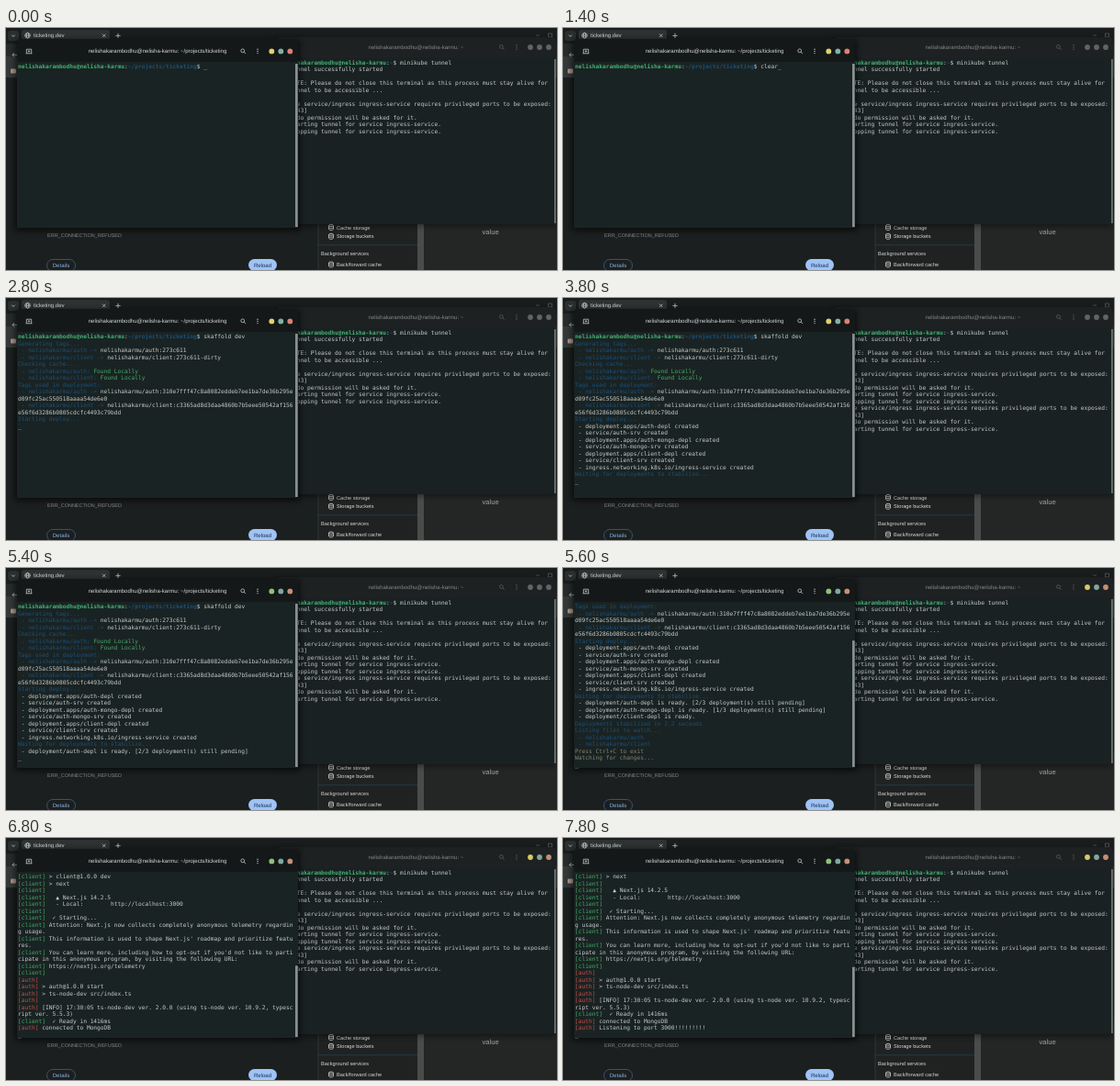
Animation, 600 px wide and 264 px high, one loop 8000 ms. Source, as an HTML page:

```html
<!DOCTYPE html>
<html lang="en">
<head>
<meta charset="utf-8">
<title>Terminal session</title>
<style>
  html, body { margin: 0; width: 100%; height: 100%; overflow: hidden; background: #1c1f1f; }
  svg { display: block; width: 600px; height: 264px; }
  text { text-rendering: geometricPrecision; white-space: pre; }
  .ui { font-family: "Liberation Sans", Arial, sans-serif; font-size: 6.05px; fill: #d4d8d8; }
  .mono { font-family: "DejaVu Sans Mono", "Noto Sans Mono", monospace; font-size: 6.23px; fill: #c6cbca; }
  .p { fill: #42b073; font-weight: bold; }
  .d { fill: #1a5079; font-weight: bold; }
  .b { fill: #1a5079; }
  .g { fill: #44ab66; }
  .r { fill: #c44f49; }
  .y { fill: #84836c; }
  .line { fill: none; stroke: #c4c9c9; stroke-width: .8; }
</style>
</head>
<body>
<svg viewBox="0 0 600 264">
  <defs>
    <g id="search" class="line"><circle cx="-.6" cy="-.6" r="1.9"/><path d="M.8 .8L2.7 2.7"/></g>
    <g id="menu" fill="#c4c9c9"><circle cy="-2.2" r=".7"/><circle r=".7"/><circle cy="2.2" r=".7"/></g>
    <g id="store" class="line" stroke-width=".7">
      <ellipse cy="-2" rx="2.5" ry="1"/><path d="M-2.5 -2V2C-2.5 3.3 2.5 3.3 2.5 2V-2M-2.5 0C-2.5 1.3 2.5 1.3 2.5 0"/>
    </g>
    <filter id="soft" x="-10%" y="-10%" width="120%" height="120%"><feGaussianBlur stdDeviation="3"/></filter>
  </defs>

  <!-- browser -->
  <rect width="600" height="264" fill="#1c1f1f"/>
  <rect width="600" height="17" fill="#1a1d1d"/>
  <rect x="2" y="3" width="12" height="11" rx="3" fill="#2a2f30"/>
  <path class="line" d="M6.3 7.6L8 9.4L9.7 7.6"/>
  <path d="M14 17Q17 17 17 14V5Q17 2 20 2H110Q113 2 113 5V14Q113 17 116 17Z" fill="#2e3233"/>
  <rect y="17" width="600" height="14" fill="#262a2b"/>
  <rect y="31" width="600" height="23" fill="#343838"/>
  <g class="line" stroke-width=".6"><circle cx="23.5" cy="8.2" r="2.8"/><ellipse cx="23.5" cy="8.2" rx="1.2" ry="2.8"/><path d="M20.7 8.2H26.3"/></g>
  <text class="ui" x="30" y="10.4">ticketing.dev</text>
  <path class="line" d="M105 6.6L108.4 10M108.4 6.6L105 10M119.4 8.4H124.6M122 5.8V11"/>
  <path class="line" d="M577 8H581M590.5 6H594.5V9.8H590.5Z" opacity=".35"/>
  <path class="line" d="M12 29.3H7M9.2 27L6.9 29.3L9.2 31.6"/>
  <rect x="5" y="44.5" width="6" height="5" rx="1" fill="#a9938a"/>
  <text class="ui" x="45" y="227.8" style="font-size:5.5px;fill:#858b8c">ERR_CONNECTION_REFUSED</text>
  <rect x="44.5" y="252.5" width="31" height="13" rx="6.5" fill="none" stroke="#3c6187" stroke-width=".8"/>
  <text class="ui" x="60" y="261" text-anchor="middle" style="fill:#82b0e8">Details</text>
  <rect x="264" y="252" width="31" height="13" rx="6.5" fill="#9fc3f5"/>
  <text class="ui" x="279.5" y="260.6" text-anchor="middle" style="fill:#163254">Reload</text>

  <!-- developer tools -->
  <rect x="340" y="200" width="108" height="64" fill="#202221"/>
  <rect x="448" y="200" width="7" height="64" fill="#4a4c4b"/>
  <rect x="455" y="200" width="145" height="64" fill="#242626"/>
  <path d="M340 200V264" stroke="#343d40" stroke-width=".8"/>
  <path d="M340 236.8H448" stroke="#233d45" stroke-width="1"/>
  <use href="#store" x="354" y="217.5"/><use href="#store" x="354" y="227.3"/><use href="#store" x="354" y="258"/>
  <g class="ui" style="font-size:5.6px">
    <text x="360" y="219.5">Cache storage</text>
    <text x="360" y="229.3">Storage buckets</text>
    <text x="343" y="248">Background services</text>
    <text x="360" y="260">Back/forward cache</text>
  </g>
  <text class="ui" x="518.5" y="224.6" style="font-size:7.6px;fill:#a0a5a5">value</text>

  <!-- right terminal -->
  <rect x="294" y="12" width="305" height="204" fill="#000" opacity=".45" filter="url(#soft)"/>
  <path d="M294 214V15Q294 10 299 10H594Q599 10 599 15V214Z" fill="#192122"/>
  <path d="M294 32V15Q294 10 299 10H594Q599 10 599 15V32Z" fill="#1e2122"/>
  <text class="ui title" x="446.5" y="22.8" text-anchor="middle" style="fill:#828787"></text>
  <g opacity=".35"><use href="#search" x="540" y="21"/><use href="#menu" x="556" y="21"/></g>
  <g id="dotsR"></g>
  <g id="right" class="mono"></g>
  <rect x="597" y="34" width="1.8" height="179" fill="#6d7373"/>

  <!-- left terminal -->
  <rect x="10" y="13" width="310" height="208" fill="#000" opacity=".6" filter="url(#soft)"/>
  <path d="M12 218V17Q12 12 17 12H313Q318 12 318 17V218Z" fill="#1a2323"/>
  <path d="M12 37V17Q12 12 17 12H313Q318 12 318 17V37Z" fill="#141818"/>
  <path class="line" d="M22.3 27.8V23.2H27.7V27.8M21.6 27.8H28.4M25 24.2V26.6M23.8 25.4H26.2" stroke-width=".7"/>
  <text class="ui title" x="165" y="27.4" text-anchor="middle"></text>
  <use href="#search" x="258.3" y="25.4"/><use href="#menu" x="274" y="25.4"/>
  <g id="dotsL"></g>
  <g id="left" class="mono"></g>
  <rect id="thumb" x="315" width="2.7" fill="#8a9090"/>
</svg>
<script>
const USER = 'nelishakarambodhu', HOST = 'nelisha-karmu', REPO = 'nelishakarmu';
const LOOP = 8000, ROWS = 24, ROW_H = 7.5;
const $ = id => document.getElementById(id);

// {x text} colours a run with class x
const prompt = (dir, cmd) => `{p ${USER}@${HOST}}:{d ${dir}}$ ${cmd}`;
const c = s => '{g [client]}' + s;
const a = s => '{r [auth]}' + s;
const tag = (app, v) => `{b  - ${REPO}/${app} -> }${REPO}/${app}:${v}`;
const found = app => `{b  - ${REPO}/${app}: }{g Found Locally}`;

const typed = [[0, ''], [1400, 'clear'], [1600, 'skaffold dev']];
const ENTER = 1800;

const output = [
  [2800, [
    '{b Generating tags...}',
    tag('auth', '273c611'),
    tag('client', '273c611-dirty'),
    '{b Checking cache...}',
    found('auth'),
    found('client'),
    '{b Tags used in deployment:}',
    tag('auth', '310e7fff47c8a8082eddeb7ee1ba7de36b295e'),
    'd09fc25ac550518aaaa54de6e0',
    tag('client', 'c3365ad8d3daa4860b7b5eee50542af156'),
    'e56f6d3286b0805cdcfc4493c79bdd',
    '{b Starting deploy...}'
  ]],
  [3400, [
    ...['deployment.apps/auth-depl', 'service/auth-srv', 'deployment.apps/auth-mongo-depl',
      'service/auth-mongo-srv', 'deployment.apps/client-depl', 'service/client-srv',
      'ingress.networking.k8s.io/ingress-service'].map(n => ` - ${n} created`),
    '{b Waiting for deployments to stabilize...}'
  ]],
  [4600, [' - deployment/auth-depl is ready. [2/3 deployment(s) still pending]']],
  [5600, [
    ' - deployment/auth-mongo-depl is ready. [1/3 deployment(s) still pending]',
    ' - deployment/client-depl is ready.',
    '{b Deployments stabilized in 2.2 seconds}',
    '{b Listing files to watch...}',
    `{b  - ${REPO}/auth}`,
    `{b  - ${REPO}/client}`,
    '{y Press Ctrl+C to exit}',
    '{y Watching for changes...}'
  ]],
  [5800, [
    c(''),
    c(' > client@1.0.0 dev'),
    c(' > next'),
    c(''),
    c('   ▲ Next.js 14.2.5'),
    c('   - Local:        http://localhost:3000'),
    c(''),
    c('  ✓ Starting...')
  ]],
  [6000, [
    c(' Attention: Next.js now collects completely anonymous telemetry regardin'),
    'g usage.',
    c(" This information is used to shape Next.js' roadmap and prioritize featu"),
    'res.',
    c(" You can learn more, including how to opt-out if you'd not like to parti"),
    'cipate in this anonymous program, by visiting the following URL:',
    c(' https://nextjs.org/telemetry'),
    c(''),
    a(''),
    a(' > auth@1.0.0 start'),
    a(' > ts-node-dev src/index.ts'),
    a(''),
    a(' [INFO] 17:30:05 ts-node-dev ver. 2.0.0 (using ts-node ver. 10.9.2, typesc'),
    'ript ver. 5.5.3)'
  ]],
  [6400, [c('  ✓ Ready in 1416ms')]],
  [6800, [a(' connected to MongoDB')]],
  [7000, [a(' Listening to port 3000!!!!!!!!!')]]
];

const ports = [
  '     e service/ingress ingress-service requires privileged ports to be exposed:',
  '[80 443]',
  '     do permission will be asked for it.',
  '     arting tunnel for service ingress-service.'
];
const tunnel = [
  [0, [
    prompt('~', 'minikube tunnel'),
    '     nnel successfully started',
    '',
    '     TE: Please do not close this terminal as this process must stay alive for',
    '     nnel to be accessible ...',
    '',
    ...ports,
    '     opping tunnel for service ingress-service.'
  ]],
  [3600, ports]
];

const shown = (log, t) => log.filter(([at]) => at <= t).flatMap(([, lines]) => lines);

function draw(el, lines, x, y) {
  el.innerHTML = lines.map((s, i) => {
    const runs = s.replace(/>/g, '&gt;').replace(/\{(\w) (.*?)\}/g, '<tspan class="$1">$2</tspan>');
    return `<text x="${x}" y="${y + i * ROW_H}">${runs}</text>`;
  }).join('');
}

function dots(el, x, y, colors) {
  el.innerHTML = colors.map((f, i) => `<circle cx="${x + i * 10}" cy="${y}" r="2.9" fill="${f}"/>`).join('');
}

function render(t) {
  const cmd = typed.filter(([at]) => at <= t).pop()[1];
  const lines = [prompt('~/projects/ticketing', cmd), ...shown(output, t)];
  if (t < ENTER) lines[0] += '_';
  else lines.push('_');
  draw($('left'), lines.slice(-ROWS), 13, 44);
  draw($('right'), shown(tunnel, t), 298, 39.6);

  const h = 178 * Math.min(1, ROWS / lines.length);
  $('thumb').setAttribute('y', 217 - h);
  $('thumb').setAttribute('height', h);

  dots($('dotsL'), 289.3, 25.4, t < 4600 ? ['#ddd36a', '#7fb3a4', '#dc8170'] : ['#8fc07c', '#7fa99e', '#c58f77']);
  dots($('dotsR'), 571, 21, t < 5600 ? ['#5f6565', '#5f6565', '#5f6565'] : ['#d6cb62', '#7fa99e', '#c58f77']);
}

const [rightTitle, leftTitle] = document.querySelectorAll('.title');
rightTitle.textContent = `${USER}@${HOST}: ~`;
leftTitle.textContent = `${USER}@${HOST}: ~/projects/ticketing`;

const cuts = [...typed, ...output, ...tunnel].map(s => s[0]).concat(ENTER);
let last = -1;
function tick(now) {
  const t = now % LOOP;
  const step = Math.max(...cuts.filter(at => at <= t));
  if (step !== last) render(last = step);
  requestAnimationFrame(tick);
}
render(last = 0);
requestAnimationFrame(tick);
</script>
</body>
</html>
```
